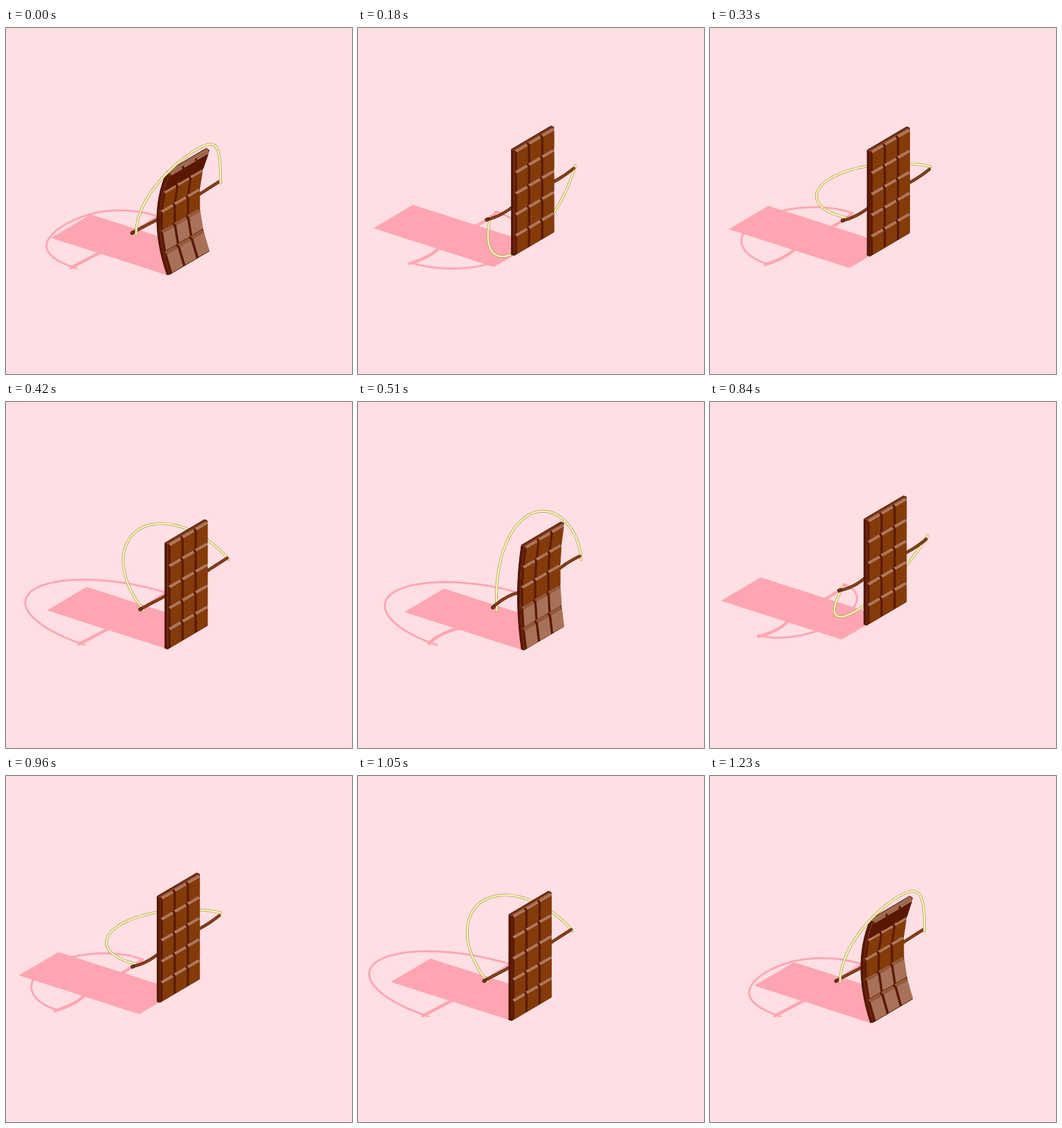
An HTML page with a canvas that plays this animation: 500x500 px, repeating every 1.26 s.

```html
<!DOCTYPE html>
<html lang="en">
<head>
<meta charset="utf-8">
<title>Skipping chocolate</title>
<style>
  html, body { margin: 0; width: 100%; height: 100%; overflow: hidden; background: #ffdfe3; }
  canvas { display: block; width: 500px; height: 500px; }
</style>
</head>
<body>
<canvas id="stage" width="500" height="500"></canvas>
<script>
const ctx = document.getElementById('stage').getContext('2d');
const LOOP = 1260, JUMP = LOOP / 2, STEP = 30;
const W = 57, H = 152, THICK = 4, SLOPE = 0.59, DEPTH = 0.33;
const ARM = { x: 61, y: -37 };
const SHADOW = '#ffa5b1', EDGE = '#471203', GROOVE = '#5c1a04';
const TONES = {
  dark: { face: '#5a1700', bevel: '#a06a50' },
  mid: { face: '#843b09', bevel: '#b0765a' },
  light: { face: '#a87259', bevel: '#95593a' }
};

const linear = (t, from, to) => Math.min(1, Math.max(0, (t - from) / (to - from)));
const smooth = (t, from, to) => {
  const q = linear(t, from, to);
  return q * q * (3 - 2 * q);
};
const easeOut = (t, from, to) => 1 - (1 - linear(t, from, to)) ** 2;

// One hop lasts JUMP; over two hops the bar drifts out and back.
function poseAt(t) {
  const p = t % JUMP;
  const drift = 12.5 * (smooth(t, 0, 500) - smooth(t, 600, 1000));
  const h = 39 * (smooth(p, 30, 275) - smooth(p, 275, 420));
  const b = 14.5 * (1 - smooth(p, 0, 60) + smooth(p, 420, JUMP));
  const recoil = Math.sin(Math.PI * linear(p, 420, 600));
  const turn = 17 + 122 * linear(p, 0, 60) + 210 * linear(p, 60, 510) + 28 * easeOut(p, 510, JUMP);
  const x = 222 + drift, y = 353.5 + 0.3 * drift;
  return {
    x, y, h, b,
    mid: { x: x + 27, y: y - 92.5 - h, z: 77 + h },
    angle: turn * Math.PI / 180,
    droop: 0.22 * h - 2 - 3 * recoil,
    sag: 0.13 * h - 4 * recoil
  };
}

// Points carry x, y on the stage and z, their height above the ground.
const cast = p => ({ x: p.x - 1.12 * p.z, y: p.y + 0.64 * p.z });

function path(pts) {
  ctx.beginPath();
  for (const p of pts) ctx.lineTo(p.x, p.y);
}

function fill(pts, color) {
  path(pts);
  ctx.closePath();
  ctx.fillStyle = color;
  ctx.fill();
}

function line(pts, color, width) {
  path(pts);
  ctx.strokeStyle = color;
  ctx.lineWidth = width;
  ctx.stroke();
}

const sample = (n, f) => Array.from({ length: n + 1 }, (_, i) => f(i / n));

// Point on the bar: u across, v up, d towards the viewer.
function barPoint({ x, y, h, b }) {
  return (u, v, d = 0) => {
    const k = 2 * v / H - 1;
    const out = b * k * k + d;
    const z = 0.15 * b + v * (1 - 0.43 * b / H) - d * b * 4 * k / H;
    return { x: x + u + out, y: y - h - u * SLOPE - z + DEPTH * out, z: z + h };
  };
}

// Half an ellipse around the hands; its ends trail while the bar is bent.
function ropePoints({ mid, angle, b }) {
  const fwd = 85 * Math.sin(angle), up = 97 * Math.cos(angle);
  return sample(48, q => {
    const c = -Math.cos(q * Math.PI), s = Math.abs(Math.sin(q * Math.PI));
    const f = fwd * s ** (1 + b / 14.5);
    return {
      x: mid.x + ARM.x * c + f,
      y: mid.y + ARM.y * c + DEPTH * f - up * s,
      z: mid.z + up * s
    };
  });
}

function armPoints({ mid, droop, sag }, side) {
  const reach = side < 0 ? -6 : -2;
  const curl = side < 0 ? sag : sag * 0.4;
  return sample(16, q => {
    const r = side * (0.4 + 0.6 * q);
    const drop = droop + 4 * curl * q * (1 - q);
    return { x: mid.x + ARM.x * r + reach * q, y: mid.y + ARM.y * r + drop, z: mid.z - drop };
  });
}

function drawShadow(at, rope, arms) {
  for (const d of [-THICK, 0]) {
    const side = u => sample(12, q => cast(at(u, q * H, d)));
    fill([...side(0), ...side(W).reverse()], SHADOW);
  }
  line(rope.map(cast), SHADOW, 2.8);
  for (const arm of arms) line(arm.map(cast), SHADOW, 4.4);
}

function drawRope(rope) {
  line(rope, '#a59a5c', 3.8);
  line(rope, '#faf4b4', 2.4);
}

function drawGrip({ x, y }) {
  for (const [r, color] of [[3.4, EDGE], [2.5, '#7a3512']]) {
    ctx.beginPath();
    ctx.ellipse(x + 1, y, r, r * 0.78, -0.5, 0, 7);
    ctx.fillStyle = color;
    ctx.fill();
  }
}

function drawArm(arm) {
  line(arm, '#5a1f08', 4.4);
  line(arm, '#84401a', 3);
}

function drawTile(at, col, row, tone) {
  const cw = W / 3, ch = H / 5;
  const u = col * cw, v = row * ch, top = v + ch;
  const left = u + 2.6, right = u + cw - 0.6;
  const lip = [at(right, top - 4.4, 1.5), at(left, top - 4.4, 1.5)];
  fill([at(u + 1.2, top - 0.5), at(u + cw - 1.2, top - 0.5), ...lip], tone.bevel);
  fill([...lip, at(left, v + 1, 1.5), at(right, v + 1, 1.5)], tone.face);
}

function drawBar(at, b) {
  const edge = (u, d) => sample(15, q => at(u, q * H, d));
  const back = edge(0, -THICK), front = edge(0, 0), right = edge(W, 0).reverse();
  const roof = [at(0, H, -THICK), at(W, H, -THICK), at(W, H), at(0, H)];
  fill([...back, ...front.slice().reverse()], '#581804');
  fill([...front, ...right], GROOVE);
  fill(roof, b > 9 ? TONES.dark.bevel : '#7a3210');
  line([...back, roof[1], ...right, front[0], back[0]], EDGE, 1);
  for (let row = 0; row < 5; row++) {
    const tilt = b * (row - 2) * 0.4;
    const tone = tilt > 8 ? TONES.dark : tilt < -1 ? TONES.light : TONES.mid;
    for (let col = 0; col < 3; col++) drawTile(at, col, row, tone);
  }
  line(edge(0, 0.4), '#75290a', 0.8);
}

function draw(t) {
  const pose = poseAt(t);
  const at = barPoint(pose);
  const rope = ropePoints(pose);
  const arms = [-1, 1].map(side => armPoints(pose, side));
  const inFront = Math.sin(pose.angle) > 0;

  ctx.fillStyle = '#ffdfe3';
  ctx.fillRect(0, 0, 500, 500);
  ctx.lineCap = ctx.lineJoin = 'round';
  drawShadow(at, rope, arms);
  if (!inFront) drawRope(rope);
  arms.forEach(drawArm);
  drawGrip(arms[0].at(-1));
  drawBar(at, pose.b);
  if (inFront) drawRope(rope);
}

const start = performance.now();
function tick() {
  const t = Math.max(0, performance.now() - start) % LOOP;
  draw(Math.floor(t / STEP) * STEP);
  requestAnimationFrame(tick);
}
tick();
</script>
</body>
</html>
```
